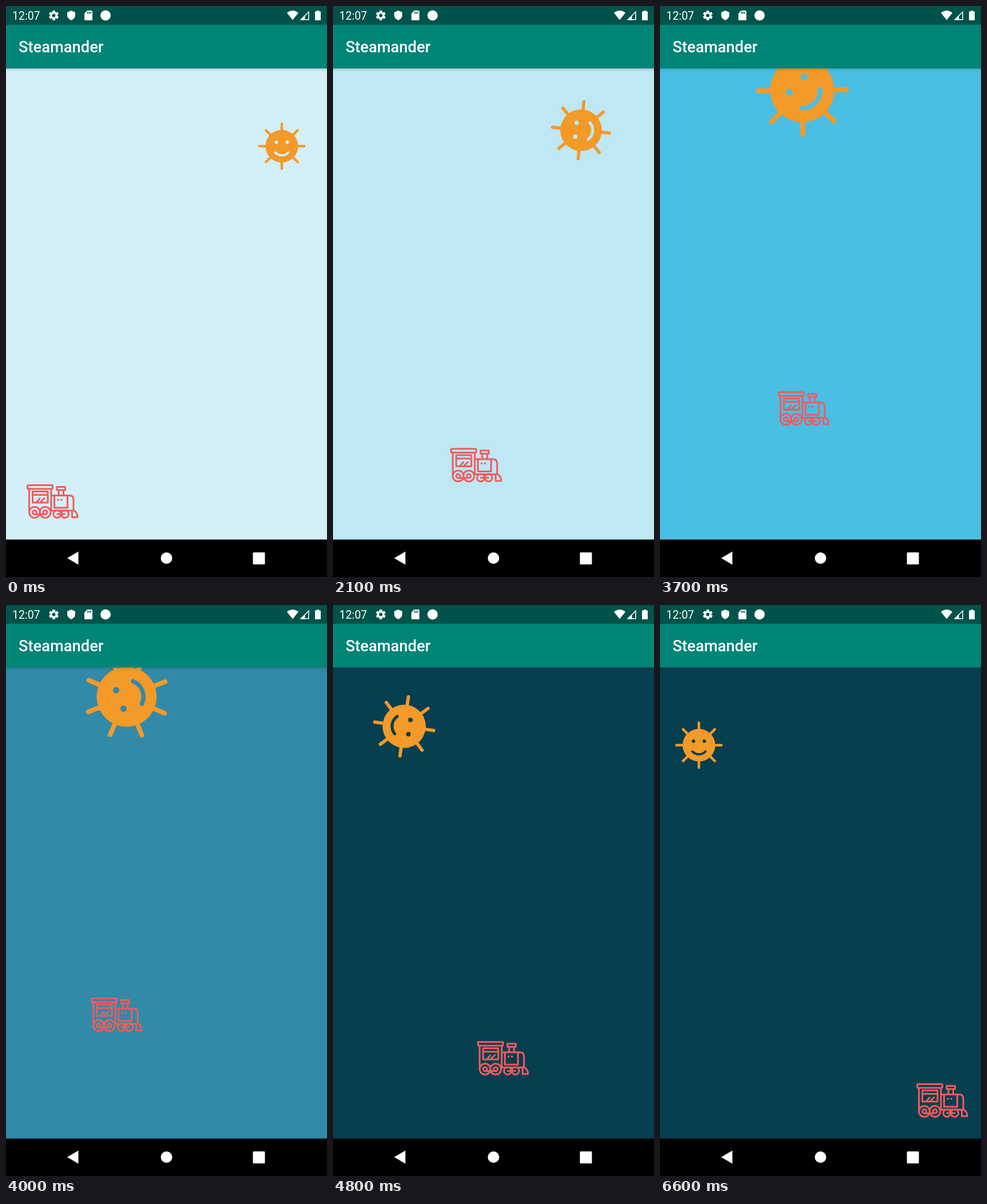
These frames come from a looping animation (561 px wide and 998 px high, 6700 ms). An HTML page with a canvas:

```html
<!DOCTYPE html>
<html lang="en">
<head>
<meta charset="utf-8">
<title>Steamander</title>
<style>
html, body { margin: 0; width: 100%; height: 100%; overflow: hidden; background: #000; }
canvas { display: block; }
</style>
</head>
<body>
<canvas id="stage" width="561" height="998"></canvas>
<script>
const ctx = document.getElementById('stage').getContext('2d');
const W = 561, LOOP = 6700, STEP = 100, START = 982, DURATION = 5028;
const WHITE = '#fff', ORANGE = '#f39a29', RED = '#f25b5d', STATUS = '#00534a';

// Sky colour stops: progress, r, g, b
const SKY = [
  [0, 211, 239, 247], [.117, 190, 232, 244], [.318, 146, 229, 243],
  [.566, 73, 190, 227], [.714, 34, 104, 128], [.79, 5, 63, 80], [1, 5, 63, 80]
];

// Cubic Hermite through evenly spaced values, tangents averaged from neighbours
function spline(v, p) {
  const n = v.length - 1;
  const i = Math.min(n - 1, Math.floor(p * n));
  const u = p * n - i, u2 = u * u, u3 = u2 * u;
  const slope = k => v[k + 1] - v[k];
  const tangent = k => (slope(Math.max(0, k - 1)) + slope(Math.min(n - 1, k))) / 2;
  return v[i] + slope(i) * (3 * u2 - 2 * u3)
    + tangent(i) * (u3 - 2 * u2 + u) + tangent(i + 1) * (u3 - u2);
}

function skyAt(p) {
  let i = 0;
  while (i < SKY.length - 2 && p > SKY[i + 1][0]) i++;
  const a = SKY[i], b = SKY[i + 1], u = (p - a[0]) / (b[0] - a[0]);
  const rgb = [1, 2, 3].map(k => Math.round(a[k] + (b[k] - a[k]) * u));
  return `rgb(${rgb})`;
}

function rect(color, x, y, w, h) {
  ctx.fillStyle = color;
  ctx.fillRect(x, y, w, h);
}

function disc(color, x, y, r) {
  ctx.fillStyle = color;
  ctx.beginPath();
  ctx.arc(x, y, r, 0, 7);
  ctx.fill();
}

function fillPath(color, d) {
  ctx.fillStyle = color;
  ctx.fill(new Path2D(d));
}

function text(str, font, x, y) {
  ctx.font = font + ' Roboto, sans-serif';
  ctx.fillStyle = WHITE;
  ctx.fillText(str, x, y);
}

function drawSun(p, sky) {
  const bump = spline([0, 1, 0], p);
  ctx.save();
  ctx.translate(482 - 414 * p, 245 - 101 * bump);
  ctx.rotate(-4 * Math.PI * p);
  ctx.scale(1 + bump, 1 + bump);
  ctx.lineCap = 'round';
  ctx.strokeStyle = ORANGE;
  ctx.lineWidth = 4.4;
  ctx.beginPath();
  for (let i = 0; i < 8; i++) {
    const c = Math.cos(i * Math.PI / 4), s = Math.sin(i * Math.PI / 4);
    ctx.moveTo(26 * c, 26 * s);
    ctx.lineTo(39.3 * c, 39.3 * s);
  }
  ctx.stroke();
  disc(ORANGE, 0, 0, 28.5);
  disc(sky, -9.5, -7, 3);
  disc(sky, 9.5, -7, 3);
  ctx.strokeStyle = sky;
  ctx.lineWidth = 4;
  ctx.beginPath();
  ctx.arc(0, .3, 15.7, .75, Math.PI - .75);
  ctx.stroke();
  ctx.restore();
}

const ring = (x, y, r) => `M${x + r} ${y}a${r} ${r} 0 1 1 ${-2 * r} 0a${r} ${r} 0 1 1 ${2 * r} 0`;
const trainLines = new Path2D([
  'M3 1.5H44Q46 1.5 45.5 4L45 8H2L1.5 4Q1 1.5 3 1.5Z',              // roof
  'M4.5 8V49M43 8V46M10.5 12.5H37V32H10.5ZM10.5 18.5H37',           // cab and window
  'M18 30.5L23 25M25 30.5L31 24.5',
  'M53 4.5H67.5V10H53ZM56 10V19M64.5 10V19',                        // chimney
  'M43 19.5H75Q82 19.5 82 27V46M48.5 19.5V41H71.5V19.5',            // boiler
  'M43 46H83Q89 50 89 57.5H79.5V46',                                // cowcatcher
  ring(14, 49, 9.5), ring(32.5, 49, 9.5),
  ring(14, 49, 3.5), ring(32.5, 49, 3.5), 'M14 52.5H29',
  ring(53.5, 52, 6.5), ring(67, 52, 6.5), 'M53.5 52H67'
].join(''));

function drawTrain(p) {
  ctx.save();
  ctx.translate(36 + 412 * spline([0, .75, .5, .25, 1], p),
    836 - spline([0, 125, 165, 125, 0], p));
  ctx.strokeStyle = RED;
  ctx.lineWidth = 3;
  ctx.lineCap = ctx.lineJoin = 'round';
  ctx.stroke(trainLines);
  disc(RED, 55, 27, 1.8);
  disc(RED, 61, 27, 1.8);
  ctx.restore();
}

function drawGear(x, y) {
  ctx.strokeStyle = WHITE;
  ctx.lineCap = 'butt';
  ctx.lineWidth = 4.5;
  ctx.beginPath();
  for (let i = 0; i < 3; i++) {
    const c = Math.cos(Math.PI * (i / 3 + .5)), s = Math.sin(Math.PI * (i / 3 + .5));
    ctx.moveTo(x - 8.5 * c, y - 8.5 * s);
    ctx.lineTo(x + 8.5 * c, y + 8.5 * s);
  }
  ctx.stroke();
  disc(WHITE, x, y, 6.4);
  disc(STATUS, x, y, 2.9);
}

function drawBars() {
  const shade = ctx.createLinearGradient(0, 109, 0, 115);
  shade.addColorStop(0, 'rgba(0,0,0,.13)');
  shade.addColorStop(1, 'rgba(0,0,0,0)');
  rect(shade, 0, 109, W, 6);
  rect('#008577', 0, 0, W, 109.2);
  rect(STATUS, 0, 0, W, 32.8);
  text('12:07', '19.5px', 11, 24);
  text('Steamander', '500 27.3px', 22, 81);

  drawGear(83.5, 16.5);
  fillPath(WHITE, 'M114 8L121 11V16Q121 22 114 25Q107 22 107 16V11Z');
  fillPath(WHITE, 'M142 8H149.5Q151 8 151 9.5V23.5Q151 25 149.5 25H138.5Q137 25 137 23.5V13Z');
  for (const x of [142, 144.7, 147.4]) rect(STATUS, x, 10, 1.5, 3.5);
  disc(WHITE, 174, 16.5, 9);
  fillPath(WHITE, 'M491 12Q501 4 511 12L501 24.5Z');
  fillPath(WHITE, 'M514 24.5L522.5 16V24.5Z');
  ctx.strokeStyle = WHITE;
  ctx.lineWidth = 1.5;
  ctx.stroke(new Path2D('M515.5 23.7H529V10.2Z'));
  fillPath(WHITE, 'M543 8H547V9.5H550V25H540V9.5H543Z');

  rect('#000', 0, 932.5, W, 65.5);
  fillPath(WHITE, 'M107 965L126.5 953.5V976.5Z');
  disc(WHITE, 280.5, 965, 10);
  ctx.fillStyle = WHITE;
  ctx.beginPath();
  ctx.roundRect(431.5, 955, 21, 21, 1.5);
  ctx.fill();
}

function draw(now) {
  const t = Math.floor(now % LOOP / STEP) * STEP;
  const u = Math.min(1, Math.max(0, (t - START) / DURATION));
  const p = (1 - Math.cos(Math.PI * u)) / 2;
  const sky = skyAt(p);
  rect(sky, 0, 0, W, 998);
  drawSun(p, sky);
  drawTrain(p);
  drawBars();
  requestAnimationFrame(draw);
}

draw(performance.now());
</script>
</body>
</html>
```
